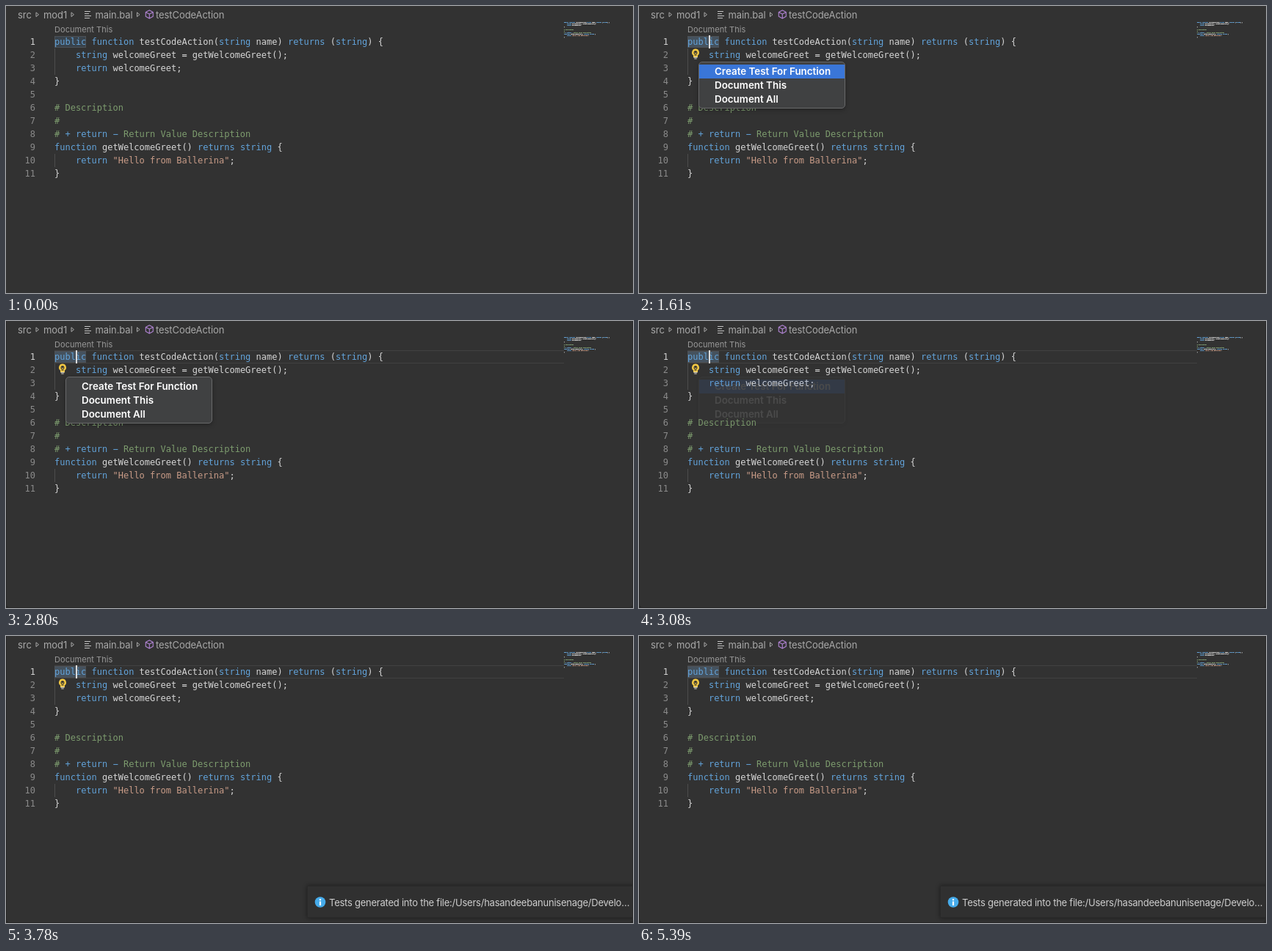
An HTML page that plays this animation: 854x392 px, repeating every 5.46 s.

```html
<!DOCTYPE html>
<html lang="en">
<head>
<meta charset="utf-8">
<title>Editor code action</title>
<style>
  html, body { margin: 0; width: 100%; height: 100%; overflow: hidden; background: #323232; }
  #stage { position: relative; width: 854px; height: 392px; overflow: hidden; background: #323232; }
  #stage > * { position: absolute; }
  #stage { --loop: 5460ms step-end infinite; }

  .ui { font: 13px/18px Inter, "Open Sans", sans-serif; letter-spacing: -.24px; color: #a9a9a9; white-space: nowrap; }
  .crumb { top: 3px; letter-spacing: -.08px; }
  .lens { left: 66px; top: 23px; font-size: 11px; letter-spacing: .05px; color: #999; }

  pre { margin: 0; font: 12px/18px "DejaVu Sans Mono", "Liberation Mono", monospace; color: #d6d6d6; }
  pre b { font-weight: normal; color: #62a3da; }
  pre i { font-style: normal; color: #7d9c6e; }
  pre s { text-decoration: none; color: #c89b87; }
  #code { left: 66px; top: 40px; }
  #map { left: 760px; top: 22px; transform: scale(.1384, .1111); transform-origin: 0 0;
    -webkit-text-stroke: 1.2px; filter: brightness(1.15); }
  .nums { left: 0; top: 40px; width: 40px; text-align: right; color: #8a8a8a; }
  .nums span { color: #d0d0d0; }

  .guide { left: 66px; width: 1px; background: #4c4c4c; }
  .word { left: 66px; top: 41px; width: 43px; height: 16px; box-sizing: border-box;
    border: 1px solid #4d5156; animation: word var(--loop); }
  .row { left: 66px; top: 40px; width: 694px; height: 18px; box-sizing: border-box;
    border: solid #414141; border-width: 1px 0; animation: focus var(--loop); }
  .edge { inset: 0; box-sizing: border-box; border: solid #262626; border-width: 0 1px 1px;
    border-radius: 0 0 5px 5px; box-shadow: 0 0 0 4px #262626; animation: focus var(--loop); }
  .caret { left: 95px; top: 40px; width: 2px; height: 18px; background: #dcdcdc; animation: caret var(--loop); }
  .bulb { left: 70px; top: 57px; animation: bulb var(--loop); }

  .menu { left: 81px; top: 76px; width: 200px; height: 64px; box-sizing: border-box; padding-top: 3px;
    border: 1px solid #68696a; border-radius: 5px; background: #404142;
    box-shadow: 0 2px 6px rgba(0, 0, 0, .3); animation: menu var(--loop); }
  .menu div { height: 19px; padding-left: 21px; line-height: 19px; font-size: 13.4px; font-weight: 600;
    letter-spacing: 0; color: #fff; }
  .menu .pick { animation: pick var(--loop); }

  .toast { left: 410px; top: 341px; width: 450px; height: 44px; box-sizing: border-box;
    border: 1px solid #292929; background: #303030; box-shadow: 0 0 6px rgba(0, 0, 0, .45);
    color: #cecece; animation: toast 5460ms linear infinite; }
  .toast span { position: absolute; left: 29px; top: 13px; }
  .toast svg { position: absolute; left: 9px; top: 14px; }

  @keyframes word {
    0% { background: #39434c; }
    5.12% { background: #434b53; }
    21.79%, 100% { background: #45525e; }
  }
  @keyframes focus { 0% { opacity: 0; } 33.33%, 100% { opacity: 1; } }
  @keyframes bulb { 0% { opacity: 0; } 5.12%, 100% { opacity: 1; } }
  @keyframes caret {
    0% { opacity: 0; }
    2.56% { opacity: 1; }
    11.53% { opacity: 0; }
    21.79% { opacity: 1; }
    73.07% { opacity: 0; }
    82.05% { opacity: 1; }
    91.02%, 100% { opacity: 0; }
  }
  @keyframes menu {
    0% { opacity: 0; }
    24.35% { opacity: 1; }
    53.84% { opacity: .7; }
    55.12% { opacity: .38; }
    56.4% { opacity: .12; }
    57.69%, 100% { opacity: 0; }
  }
  @keyframes pick {
    0% { background: transparent; }
    26.92% { background: #3a76d8; }
    51.27% { background: transparent; }
    52.56%, 100% { background: #3a76d8; }
  }
  @keyframes toast {
    0%, 62.81% { transform: translateY(51px); opacity: 0; animation-timing-function: ease-out; }
    68.3%, 100% { transform: none; opacity: 1; }
  }
</style>
</head>
<body>
<div id="stage">
  <div class="word"></div>
  <div class="row"></div>
  <div class="guide" style="top:58px;height:36px"></div>
  <div class="guide" style="top:202px;height:18px"></div>

  <span class="ui crumb" style="left:16px">src</span>
  <span class="ui crumb" style="left:51px">mod1</span>
  <span class="ui crumb" style="left:121.5px">main.bal</span>
  <span class="ui crumb" style="left:204px">testCodeAction</span>
  <svg width="210" height="24" fill="none" style="left:0;top:0">
    <g stroke="#a9a9a9">
      <path id="arrow" d="M41 8.8 L44.5 11.7 L41 14.6 Z"/>
      <use href="#arrow" x="48"/>
      <use href="#arrow" x="137.5"/>
    </g>
    <path d="M107 7.5h8M107 10.5h6M107 13.5h9M107 16.5h7" stroke="#c2c2c2" stroke-width="1.2"/>
    <path d="M195.3 5.8 L200.3 8.4 V14.2 L195.3 17 L190.3 14.2 V8.4 Z M190.3 8.4 L195.3 11 L200.3 8.4 M195.3 11 V17" stroke="#b184d4" stroke-width="1.1" stroke-linejoin="round"/>
  </svg>

  <span class="ui lens">Document This</span>
  <pre class="nums"><span>1</span>
2
3
4
5
6
7
8
9
10
11</pre>
  <pre id="code"><b>public</b> <b>function</b> testCodeAction(<b>string</b> name) <b>returns</b> (<b>string</b>) {
    <b>string</b> welcomeGreet = getWelcomeGreet();
    <b>return</b> welcomeGreet;
}

<i># Description</i>
<i>#</i>
<i># <b>+ return −</b> Return Value Description</i>
<b>function</b> getWelcomeGreet() <b>returns</b> <b>string</b> {
    <b>return</b> <s>"Hello from Ballerina"</s>;
}</pre>
  <pre id="map" aria-hidden="true"></pre>

  <div class="caret"></div>
  <svg class="bulb" width="14" height="18">
    <path d="M7 1.5 a5 5 0 0 1 3 9 V13 H4 V10.5 a5 5 0 0 1 3 -9Z" fill="#f3c843"/>
    <path d="M7 4 a2.6 2.6 0 0 1 1.3 4.8 V11 H5.7 V8.8 A2.6 2.6 0 0 1 7 4Z" fill="#3a3833"/>
    <path d="M5.5 6.5 L7 8 L8.5 6.5 M7 8 V11" fill="none" stroke="#f3c843" stroke-width=".8"/>
    <path d="M4.5 13.2h5M5.3 15h3.4" stroke="#d8d5cc" stroke-width="1.2"/>
  </svg>

  <div class="menu ui">
    <div class="pick">Create Test For Function</div>
    <div>Document This</div>
    <div>Document All</div>
  </div>

  <div class="toast ui">
    <svg width="16" height="16">
      <circle cx="8" cy="7.5" r="7.3" fill="#46abea"/>
      <path d="M8 3v2.2M8 6.5v5.5" stroke="#fff" stroke-width="2.2"/>
    </svg>
    <span>Tests generated into the file:/Users/hasandeebanunisenage/Develo…</span>
  </div>
  <div class="edge"></div>
</div>
<script>
  // The minimap is a shrunken copy of the code.
  document.getElementById("map").innerHTML = document.getElementById("code").innerHTML;
</script>
</body>
</html>
```
